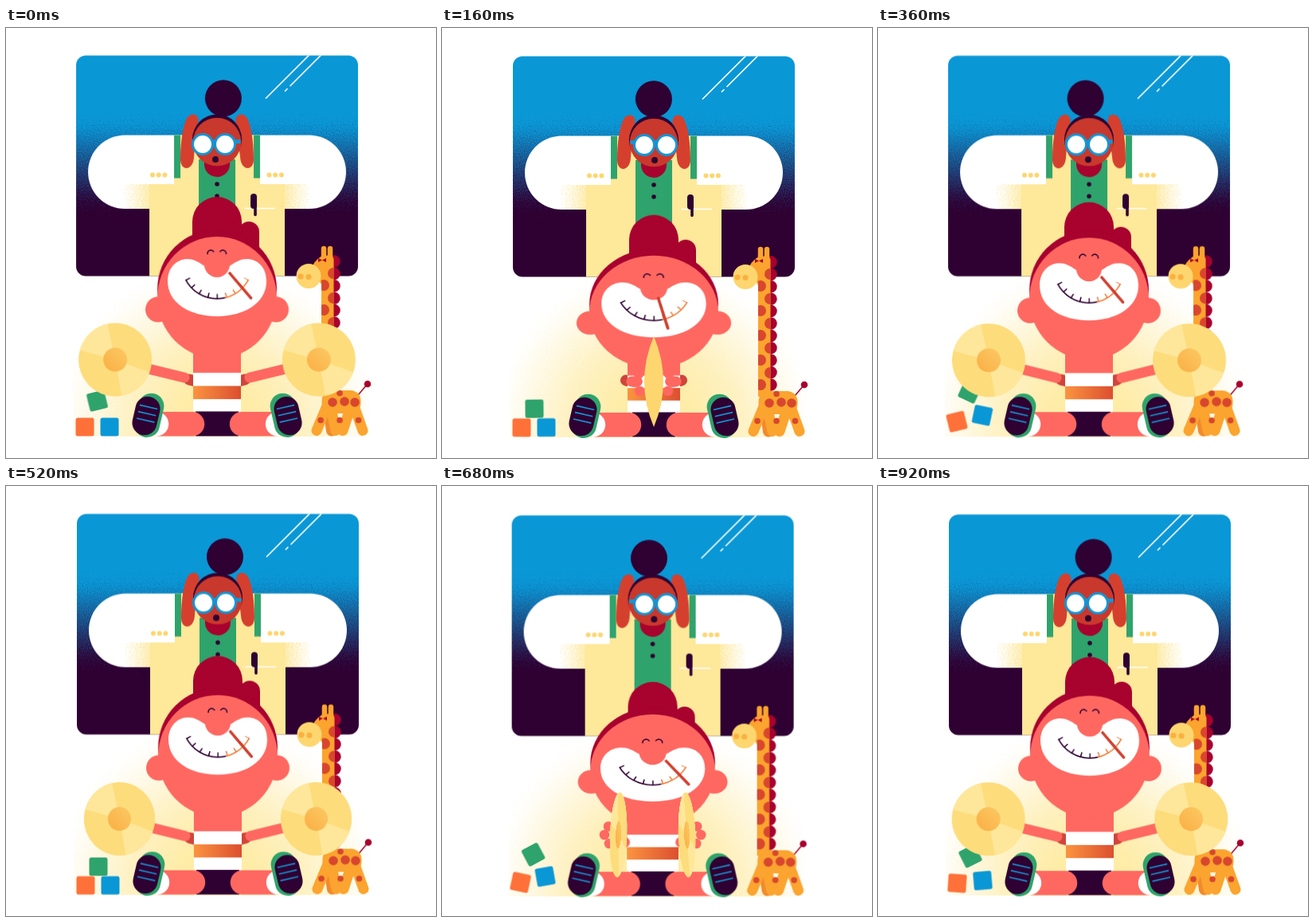
Recreate the animation shown at these times as an HTML page. Size 540 by 540 pixels, loop 0.96 s.

```html
<!DOCTYPE html>
<html lang="en">
<head>
<meta charset="utf-8">
<title>Cymbals</title>
<style>
html, body { margin: 0; width: 100%; height: 100%; overflow: hidden; background: #fff; }
#cam { position: absolute; inset: 0; animation: shake .96s linear infinite; }
svg { position: absolute; left: 0; top: 0; width: 540px; height: 540px; overflow: visible; will-change: transform; }

.ink { fill: #2f0032; }
.maroon { fill: #a8022e; }
.skin { fill: #fe6861; }
.white { fill: #fff; }
.green { fill: #2fa36c; }
.cream { fill: #fee899; }
.gold { fill: #fdd66f; }
.amber { fill: #fba42f; }
.rust { fill: #d5402e; }
.line { fill: none; stroke-linecap: round; }

.bun, .gaze, .head, .tuft, .face, .needle, .torso, .arm, .hand, .cym, .disc, .lens, .block {
  animation: .48s linear infinite;
}
.bun { animation: swing .24s cubic-bezier(.37, 0, .63, 1) -.44s infinite alternate; }
.gaze { --reach: 1px; animation-name: gaze; }
.mouth { --reach: .5px; }
.head { animation-name: head; transform-origin: 265px 338.5px; }
.tuft { animation-name: tuft; }
.face { animation-name: face; transform-origin: 265px 283px; }
.needle { animation-name: needle; transform-origin: 294px 323px; }
.torso { animation-name: torso; transform-origin: 265px 482px; }
.arm { animation-name: arm; }
.hand { animation-name: hand; }
.cym { animation-name: cym; }
.disc { animation-name: hide; }
.right .art { transform: scaleX(-1); }
.lens { animation-name: show; }
.block { transform-box: fill-box; transform-origin: center; }
.b1 { animation-name: hop1; }
.b2 { animation-name: hop2; }
.b3 { animation-name: hop3; }

@keyframes shake {
  0%, 100% { transform: none; }
  16.67% { transform: translate(1px, 1px); }
  37.5% { transform: translate(0, .3px); }
  54.17% { transform: translate(1px, .5px); }
  70.83% { transform: translate(-.4px, 2.4px); }
  79.17% { transform: translate(-1px, 1px); }
  95.83% { transform: translate(1px, 1.3px); }
}
@keyframes swing {
  from { transform: translateX(9px); }
  to { transform: translateX(-9px); }
}
@keyframes gaze {
  0%, 8.33%, 91.67%, 100% { transform: none; }
  33.33% { transform: translateX(calc(6 * var(--reach))); }
  41.67%, 58.33% { transform: translateX(calc(7.5 * var(--reach))); }
  75% { transform: translateX(calc(2 * var(--reach))); }
}
@keyframes head {
  0%, 91.67%, 100% { transform: none; }
  8.33% { transform: none; animation-timing-function: ease-in; }
  33.33% { transform: translateY(17px) scale(1.08, .925); }
  41.67% { transform: translateY(17px) scale(1.045, .925); animation-timing-function: ease-out; }
  58.33% { transform: translateY(5px) scale(1.01, 1); }
  75% { transform: translateY(1px); }
}
@keyframes tuft {
  0%, 100% { transform: none; }
  8.33% { transform: translateY(1px); animation-timing-function: ease-in; }
  33.33% { transform: translateY(21.5px); }
  41.67% { transform: translateY(32px); animation-timing-function: ease-out; }
  58.33% { transform: translateY(14.5px); }
  75% { transform: translateY(6.5px); }
  91.67% { transform: translateY(1.5px); }
}
@keyframes face {
  0%, 100% { transform: none; }
  8.33% { transform: none; animation-timing-function: ease-in; }
  33.33% { transform: translateY(28.5px) scale(1.06, .96); }
  41.67% { transform: translateY(37px) scale(1.06, .94); animation-timing-function: ease-out; }
  58.33% { transform: translateY(12.5px) scale(1.01, .99); }
  75% { transform: translateY(5px); }
  91.67% { transform: translateY(.5px); }
}
@keyframes needle {
  0%, 8.33%, 41.67%, 100% { transform: none; }
  33.33% { transform: translate(-18.5px, 7px) rotate(25deg); }
}
@keyframes torso {
  0%, 8.33%, 58.33%, 100% { transform: none; }
  33.33% { transform: scale(1.1, .95); }
  41.67% { transform: scale(1.08, .95); }
}
@keyframes arm {
  0%, 91.67%, 100% { d: path("M224 439L150 421"); }
  8.33% { d: path("M224 439L155 422"); animation-timing-function: ease-in; }
  33.33% { d: path("M237 443L245 443"); }
  41.67% { d: path("M230 445L220 437"); animation-timing-function: ease-out; }
  58.33% { d: path("M226 441L165 427"); }
  75% { d: path("M224 439L152 421"); }
}
@keyframes hand {
  0%, 75%, 100% { transform: translate(142px, 417px); }
  8.33% { transform: translate(146px, 418px); animation-timing-function: ease-in; }
  33.33% { transform: translate(247px, 444px); }
  41.67% { transform: translate(210.5px, 436px); animation-timing-function: ease-out; }
  58.33% { transform: translate(155px, 419px); }
}
@keyframes cym {
  0%, 100% { transform: translate(137px, 416.5px); }
  8.33% { transform: translate(141.5px, 417.5px) scale(.97, 1); animation-timing-function: ease-in; }
  33.33% { transform: translate(255px, 443px) scale(.2, 1.2); }
  41.67% { transform: translate(223.5px, 436px) rotate(2deg) scale(.22, 1.16); animation-timing-function: ease-out; }
  58.33% { transform: translate(151px, 419px) scale(.91, 1.02); }
  75% { transform: translate(139px, 417px); }
  91.67% { transform: translate(137.7px, 417px); }
}
@keyframes hide {
  0%, 29%, 38.01%, 100% { opacity: 1; }
  29.01%, 38% { opacity: 0; }
}
@keyframes show {
  0%, 29%, 38.01%, 100% { opacity: 0; }
  29.01%, 38% { opacity: 1; }
}
@keyframes hop1 {
  0%, 100% { transform: translate(-.5px, -9.5px) rotate(-14deg); }
  8.33%, 33.33% { transform: none; }
  41.67% { transform: translate(0, -17px) rotate(-28deg); }
  58.33% { transform: translate(0, -20.5px) rotate(-30deg); }
  75% { transform: translate(0, -21px) rotate(26deg); }
  91.67% { transform: translate(0, -14px) rotate(-27deg); }
}
@keyframes hop2 {
  0%, 33.33%, 100% { transform: none; }
  41.67% { transform: translate(0, -5.5px) rotate(12deg); }
  58.33% { transform: translate(-.5px, -9px) rotate(14deg); }
  75% { transform: translate(0, -7px) rotate(-14deg); }
  91.67% { transform: translate(-.5px, -3.5px) rotate(4deg); }
}
@keyframes hop3 {
  0%, 33.33%, 100% { transform: none; }
  41.67% { transform: translate(0, -13px) rotate(-10deg); }
  58.33% { transform: translate(1px, -14.5px) rotate(-12deg); }
  75% { transform: translate(1px, -15px) rotate(12deg); }
  91.67% { transform: translate(.5px, -7px) rotate(-5deg); }
}
</style>
</head>
<body>
<div id="cam">

<!-- static scenery -->
<svg viewBox="0 0 540 540">
  <defs>
    <filter id="grain" filterUnits="userSpaceOnUse" x="0" y="0" width="540" height="540" color-interpolation-filters="sRGB">
      <feTurbulence type="fractalNoise" baseFrequency=".85" numOctaves="1" seed="4"/>
      <feDisplacementMap in="SourceGraphic" scale="85" xChannelSelector="R" yChannelSelector="G"/>
    </filter>
    <linearGradient id="dusk" gradientUnits="userSpaceOnUse" x1="0" y1="122" x2="0" y2="222">
      <stop offset="0" stop-color="#0a97d6"/><stop offset="1" stop-color="#2f0032"/>
    </linearGradient>
    <linearGradient id="fold" gradientUnits="userSpaceOnUse" x1="150" y1="0" x2="380" y2="0">
      <stop offset="0" stop-color="#fff"/><stop offset=".16" stop-color="#fee899"/>
      <stop offset=".84" stop-color="#fee899"/><stop offset="1" stop-color="#fff"/>
    </linearGradient>
    <radialGradient id="glow" gradientUnits="userSpaceOnUse" cx="265" cy="500" r="195">
      <stop offset=".25" stop-color="#feeca6"/><stop offset=".55" stop-color="#fef1c0"/><stop offset="1" stop-color="#fff"/>
    </radialGradient>
    <clipPath id="pane"><rect x="88" y="34.5" width="354" height="277" rx="12"/></clipPath>
    <clipPath id="cuff"><rect x="149" y="196" width="232" height="31"/></clipPath>
    <clipPath id="floor"><rect x="84" y="311" width="372" height="202"/></clipPath>
    <clipPath id="neck"><rect x="396" y="296" width="15.5" height="165"/></clipPath>
  </defs>

  <g clip-path="url(#floor)"><rect y="200" width="540" height="340" fill="url(#glow)" filter="url(#grain)"/></g>
  <g clip-path="url(#pane)">
    <rect width="540" height="400" fill="url(#dusk)" filter="url(#grain)"/>
    <path class="line" d="M326.500 88L381.500 33M350.500 79l2.500-2.500M357 72.500L396.500 33" stroke="#fff" stroke-width="1.700"/>
  </g>

  <!-- coat -->
  <rect class="white" x="103" y="134.5" width="324" height="92.5" rx="46.2"/>
  <g clip-path="url(#cuff)"><rect y="100" width="540" height="220" fill="url(#fold)" filter="url(#grain)"/></g>
  <path class="cream" d="M211 134.5H319V196H350V311.5H180V196H211Z"/>
  <path class="green" d="M211 134.5h8v54h-8zM311 134.5h8v54h-8zM242 165h46v140h-46z"/>
  <path class="line" d="M184 184.5h16M330.5 184.5h16" stroke="#fdd66f" stroke-width="6" stroke-dasharray="0 7.7"/>
  <path class="line" d="M265 196v16" stroke="#2f0032" stroke-width="5.6" stroke-dasharray="0 15"/>
  <path class="maroon" d="M249 160h32v11a16 16 0 0 1-32 0z"/>
  <path d="M299.5 226.5h38.5" stroke="#fff" stroke-width="1.6"/>
  <path class="line" d="M311 212v11" stroke="#2f0032" stroke-width="8"/>
  <path class="line" d="M313 222v12.5" stroke="#2f0032" stroke-width="3.6"/>

  <!-- giraffe -->
  <path class="line" d="M412 293V455" stroke="#a8022e" stroke-width="15.5" stroke-dasharray="0 15.4"/>
  <path class="line" d="M399 277v14M407 277v14" stroke="#fba42f" stroke-width="6.5"/>
  <path class="line" d="M404 472L409 505.500" stroke="#f28a2c" stroke-width="14"/>
  <path class="amber" d="M411.5 462V290Q411 285.5 404 285.5L396 286.5Q386 293 383 303L396 322V462Z"/>
  <g clip-path="url(#neck)" class="line" stroke="#d8472d" stroke-width="14">
    <path d="M399 323V460" stroke-dasharray="0 31"/>
    <path d="M411 308V460" stroke-dasharray="0 31"/>
  </g>
  <circle class="gold" cx="380" cy="311.5" r="15.5"/>
  <path class="line" d="M370 312h.1M380 312.5h.1" stroke="#fbb040" stroke-width="7"/>
  <path class="maroon" d="M392 289l5 2.5 5-2.5v5l-5-2.5-5 2.5z"/>
  <path class="line" d="M442 461L453 448" stroke="#a8022e" stroke-width="1.5"/>
  <circle class="maroon" cx="454" cy="447" r="4.3"/>
  <path class="line" d="M404 472L390 505.5M407 472L414 505.5M434 472L423 505.5M436 472L448 505.5" stroke="#fba42f" stroke-width="13"/>
  <rect class="amber" x="396.5" y="455" width="49" height="29" rx="13"/>
  <path class="line" d="M410 470h.1M425 469h.1M438 470h.1" stroke="#d8472d" stroke-width="11.5"/>
  <path class="line" d="M395 492.5h.1M442.5 492.5h.1M419 492.5h.1M419 458.500h.1" stroke="#d8472d" stroke-width="7.5"/>
</svg>

<!-- moving parts -->
<svg viewBox="0 0 540 540">
  <defs>
    <linearGradient id="band"><stop offset="0" stop-color="#fb9440"/><stop offset="1" stop-color="#dc4f30"/></linearGradient>
    <linearGradient id="hub" x1="0" y1="1" x2="1" y2="0"><stop offset="0" stop-color="#fbae45"/><stop offset="1" stop-color="#fcca64"/></linearGradient>
    <linearGradient id="grin" gradientUnits="userSpaceOnUse" x1="274" y1="0" x2="276" y2="0">
      <stop offset="0" stop-color="#2f0032"/><stop offset="1" stop-color="#f5813f"/>
    </linearGradient>
  </defs>

  <!-- grown-up -->
  <circle class="bun ink" cx="265" cy="88.3" r="23"/>
  <g class="pair"><path class="rust" d="M226.5 114.5C230 106 242 106 241.5 117C240 135 238 140 236 162C235 180 219 180 219 165C219 142 222 125 226.5 114.5Z"/></g>
  <circle class="ink" cx="265" cy="139.5" r="31"/>
  <circle cx="265" cy="143" r="30.3" fill="#c9382c"/>
  <path d="M235.500 142.500H294.500" stroke="#1595d3" stroke-width="5"/>
  <g class="gaze white" stroke="#1595d3" stroke-width="3">
    <circle cx="247" cy="146" r="12.5"/><circle cx="275" cy="146" r="12.5"/>
  </g>
  <circle class="gaze mouth ink" cx="263" cy="165" r="4"/>

  <!-- blocks -->
  <rect class="block b1 green" x="103.5" y="466" width="23" height="23" rx="2.5"/>
  <rect class="block b2" x="87.5" y="489.5" width="23" height="23" rx="2.5" fill="#ff7138"/>
  <rect class="block b3" x="118.5" y="489.5" width="23" height="23" rx="2.5" fill="#0a97d6"/>

  <!-- child -->
  <g class="pair"><path class="line" d="M230 441.5L236 443" stroke="#d0453a" stroke-width="14"/></g>
  <rect class="ink" x="238" y="481" width="54" height="31.5"/>
  <g class="torso">
    <rect class="skin" x="235" y="395" width="60" height="40"/>
    <rect class="white" x="235" y="433" width="60" height="48.5"/>
    <rect x="235" y="449.5" width="60" height="16.5" fill="url(#band)"/>
  </g>
  <g class="pair">
    <path class="skin" d="M190 482h44a15.2 15.2 0 0 1 0 30.5h-44z"/>
    <circle class="white" cx="189" cy="497.2" r="15.2"/>
    <g transform="rotate(13 178 487)">
      <rect class="green" x="163.5" y="458" width="32" height="56" rx="16"/>
      <rect class="ink" x="160.500" y="463" width="31" height="49" rx="15.500"/>
      <path d="M165 476h23M165 484.500h23M165 493h23" stroke="#1595d3" stroke-width="1.6"/>
    </g>
  </g>

  <g class="tuft maroon">
    <path d="M234 243a31 31 0 0 1 62 0v50h-62z"/>
    <path d="M292 256a13 13 0 0 1 26 0v30h-26z"/>
  </g>
  <g class="head">
    <circle class="maroon" cx="265" cy="328" r="75"/>
    <g class="skin">
      <ellipse cx="265" cy="338.5" rx="75" ry="76.5"/>
      <circle cx="191" cy="353.5" r="16"/><circle cx="339" cy="353.5" r="16"/>
    </g>
  </g>
  <g class="face">
    <path class="line" d="M253 283.5a4.2 4.7 0 0 1 8.4 0M268 283.5a4.2 4.7 0 0 1 8.4 0" stroke="#2f0032" stroke-width="1.6"/>
    <path class="white" d="M203 318C203 300 215 290 228 290C243 290 248 303 265 303C282 303 287 290 302 290C316 290 327 300 327 318C327 345 300 362 265 362C230 362 203 345 203 318Z"/>
    <circle class="skin" cx="265" cy="297" r="16"/>
    <g fill="none" stroke="url(#grin)">
      <path d="M225.5 316A44.5 44.5 0 0 0 304.5 316" stroke-width="1.7"/>
      <path d="M228.2 314.6A41.5 41.5 0 0 0 301.8 314.6" stroke-width="6" stroke-dasharray="1.5 9.65"/>
    </g>
    <path class="needle line" d="M281 308L307.5 339" stroke="#d0402f" stroke-width="3.6"/>
  </g>

  <g class="pair">
    <path class="arm line" d="M224 439L150 421" stroke="#fe6861" stroke-width="13"/>
    <g class="hand skin"><circle cy="-10.5" r="6.3"/><circle cx="-5" r="6.3"/><circle cx="1" cy="11" r="6.3"/></g>
    <g class="cym"><g class="disc"><g class="art">
      <circle r="46" fill="#fddc7c"/>
      <path fill="#fee79a" d="M0 0L-44.4-11.9A46 46 0 0 1-9.6-45ZM0 0L43.2 15.7A46 46 0 0 1 8 45.3Z"/>
      <circle r="15" fill="url(#hub)"/>
    </g></g></g>
  </g>
  <path class="lens gold" d="M265 386Q289 443 265 500Q241 443 265 386Z"/>
</svg>
</div>
<script>
// Mirror every paired part about the vertical axis x = 265.
for (const left of document.querySelectorAll('.pair')) {
  const right = left.cloneNode(true);
  right.setAttribute('class', 'right');
  right.setAttribute('transform', 'translate(530) scale(-1 1)');
  left.after(right);
}
</script>
</body>
</html>
```
